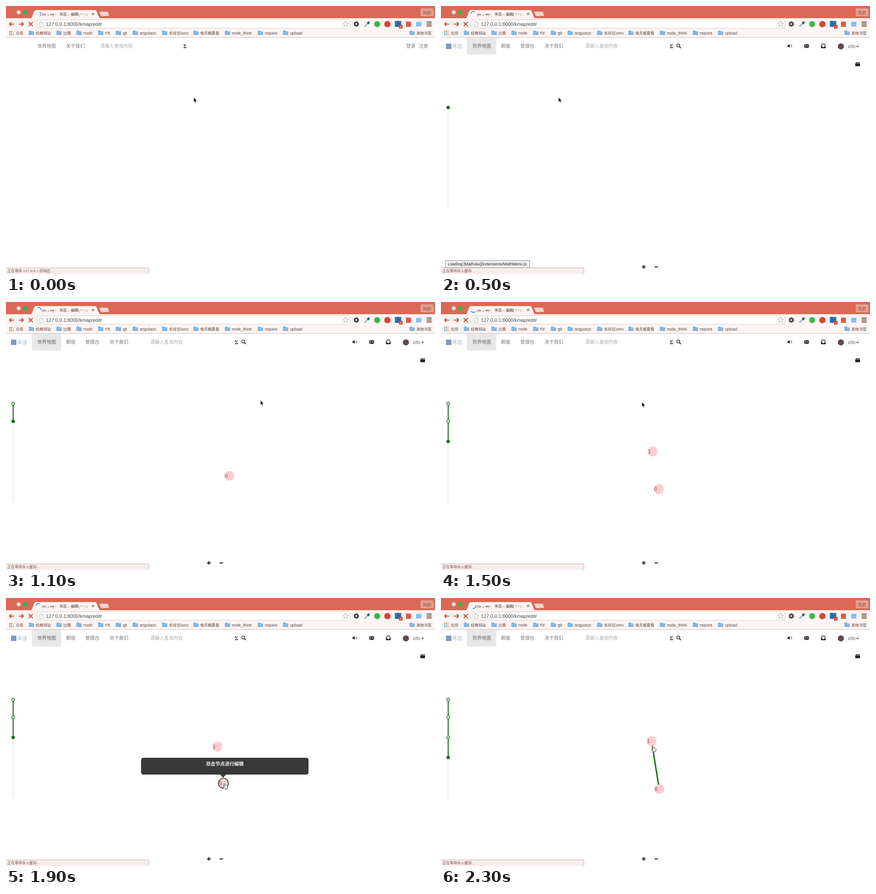
Recreate the animation shown at these times as an HTML page with a canvas. Size 946 by 592 pixels, loop 2.4 s.

```html
<!DOCTYPE html>
<html lang="zh-CN">
<head>
<meta charset="utf-8">
<title>知识图编辑</title>
<style>
html, body { margin: 0; width: 100%; height: 100%; overflow: hidden; background: #fff; }
canvas { display: block; width: 946px; height: 592px; }
</style>
</head>
<body>
<canvas id="stage" width="946" height="592"></canvas>
<script>
const c = document.getElementById('stage').getContext('2d');
const SANS = '"Liberation Sans", "Noto Sans CJK SC", sans-serif';
const SERIF = '"Liberation Serif", serif';
const GREEN = '#087410';
const RED = '#cb513d';
const LOOP = 2400, STEP = 100;

function text(s, x, y, size, color, opt = {}) {
  c.font = `${opt.bold ? 'bold ' : ''}${size}px ${opt.font || SANS}`;
  c.textAlign = opt.align || 'left';
  c.fillStyle = color;
  c.fillText(s, x, y);
}
function rect(x, y, w, h, color) {
  c.fillStyle = color;
  c.fillRect(x, y, w, h);
}
function box(x, y, w, h, r, fill, line) {
  c.beginPath();
  c.roundRect(x, y, w, h, r);
  paint(fill, line, 1);
}
function disc(x, y, r, fill, line, w) {
  c.beginPath();
  c.arc(x, y, r, 0, Math.PI * 2);
  paint(fill, line, w);
}
function shape(pts, fill, line, w, open) {
  c.beginPath();
  for (let i = 0; i < pts.length; i += 2) c.lineTo(pts[i], pts[i + 1]);
  if (!open) c.closePath();
  paint(fill, line, w);
}
function paint(fill, line, w = 1) {
  if (fill) { c.fillStyle = fill; c.fill(); }
  if (line) { c.strokeStyle = line; c.lineWidth = w; c.stroke(); }
}
const line = (pts, color, w) => shape(pts, null, color, w, true);

// keys: [time, x, y] in order
function along(keys, t) {
  let i = 0;
  while (i < keys.length - 1 && keys[i + 1][0] <= t) i++;
  const a = keys[i], b = keys[i + 1];
  if (!b || t <= a[0]) return [a[1], a[2]];
  const k = (t - a[0]) / (b[0] - a[0]);
  return [a[1] + (b[1] - a[1]) * k, a[2] + (b[2] - a[2]) * k];
}

const pointer = [
  [0, 414, 202], [200, 372, 202], [500, 259, 201.5], [600, 268, 202], [900, 610, 212],
  [1100, 561, 217], [1300, 478, 221], [1500, 443, 221], [1600, 450, 260],
  [1700, 473, 370], [1800, 481, 411.5], [1900, 480, 410], [2000, 470, 350],
  [2100, 466, 327.5], [2300, 465.5, 327.5]
];
const nodeA = [
  [1000, 515, 394], [1100, 492.5, 384], [1200, 483, 380], [1300, 476, 392],
  [1500, 480, 413.5], [1800, 479.3, 409], [2100, 479.3, 409.5], [2300, 481.3, 422]
];
const nodeB = [
  [1300, 458, 342], [1500, 466.5, 330], [1800, 466, 328], [2100, 466.3, 328.5], [2300, 464.2, 316]
];

const marks = [
  ['经典网站', 50], ['比赛', 111], ['node', 155], ['FE', 203], ['git', 242], ['angularjs', 279],
  ['禾舟在lumo', 344], ['每天都要看', 413], ['node_think', 482.5], ['require', 555],
  ['upload', 610.5], ['其他书签', 889.5]
];

function folder(x, y) {
  box(x + .5, y, 6, 4, 1, '#6d9fca');
  box(x, y + 1.5, 12, 8, 1, '#82b3db');
  rect(x + .5, y + 3, 11, 1, '#a5cbe8');
}

function arrow(x, dir) {
  line([x - 5 * dir, 40, x + 4 * dir, 40], RED, 2.2);
  line([x + 1 * dir, 35.5, x + 5 * dir, 40, x + 1 * dir, 44.5], RED, 2.2);
}

function star(x, y, r) {
  const p = [];
  for (let i = 0; i < 10; i++) {
    const a = -Math.PI / 2 + i * Math.PI / 5, d = i % 2 ? r * .45 : r;
    p.push(x + d * Math.cos(a), y + d * Math.sin(a));
  }
  shape(p, '#fff', '#a6a09f', 1);
}

function gear(x, y) {
  for (let i = 0; i < 4; i++) {
    const a = i * Math.PI / 4, dx = 6 * Math.cos(a), dy = 6 * Math.sin(a);
    line([x - dx, y - dy, x + dx, y + dy], '#3c3c3c', 2.6);
  }
  disc(x, y, 4.5, '#3c3c3c');
  disc(x, y, 2, '#fbf5f4');
}

function spinner(t) {
  const n = t / STEP;
  const wait = n < 2;
  const mid = (wait ? -n * 45 : -110 + 128.6 * (n - 5)) * Math.PI / 180;
  c.beginPath();
  c.arc(71.5, 17.5, 5.6, mid - 1.05, mid + 1.05);
  paint(null, wait ? '#6f9cc4' : '#3f86cf', 1.7);
}

function chrome(t) {
  rect(0, 0, 946, 28, '#db6855');
  rect(0, 27, 946, 43, '#fcf5f4');
  rect(0, 69, 946, 1, '#c9bfbd');
  disc(28, 14, 4.7, '#dcd8d6');
  disc(43, 14, 4.7, '#2fb752');

  c.beginPath();
  c.moveTo(54, 28);
  c.bezierCurveTo(60, 25, 60, 9, 66, 9);
  c.lineTo(196, 9);
  c.bezierCurveTo(202, 9, 202, 25, 209, 28);
  paint('#fcf5f4');
  spinner(t);
  text('(ө• ₃ •ө)~', 79, 20.5, 8, '#4a3330');
  text('禾弦 – 編輯( *・', 118, 20.5, 8, '#4a3330');
  text('ω', 174, 20.5, 8, '#a69d9b');
  line([189.5, 15, 194.5, 20], '#7c6a67', 1.2);
  line([194.5, 15, 189.5, 20], '#7c6a67', 1.2);
  c.beginPath();
  c.moveTo(207, 12);
  c.lineTo(222, 12);
  c.quadraticCurveTo(225, 12, 226, 15);
  c.lineTo(228, 22);
  c.lineTo(212, 23);
  c.quadraticCurveTo(209, 23, 208, 20);
  c.lineTo(205, 13);
  c.closePath();
  paint('#f1d3cd', '#c55c4a', .7);
  box(914.5, 5.5, 28, 17, 2, '#e6a093', '#d99083');
  text('岚启', 919, 17.5, 9.3, '#8b463b');

  arrow(13, -1);
  arrow(33.5, 1);
  line([50, 35.5, 59, 44.5], RED, 2.4);
  line([59, 35.5, 50, 44.5], RED, 2.4);
  box(68.5, 30.5, 690, 18.5, 2, '#fff', '#d5c9c7');
  shape([74, 34.5, 79, 34.5, 82, 37.5, 82, 45.5, 74, 45.5], '#f7f7f7', '#b5b5b5', 1);
  line([79, 34.5, 79, 37.5, 82, 37.5], '#b5b5b5', .8);
  text('127.0.0.1:8000/kmap/edit/', 88, 43.7, 10.7, '#444');
  star(749, 40, 6.5);

  gear(772.5, 39.8);
  line([790.5, 45.5, 797, 39], '#88a5bd', 2.4);
  line([796, 36, 800, 40], '#39424d', 2);
  line([797.5, 38.5, 801, 35], '#39424d', 4);
  disc(818.5, 40, 6.8, '#4bb34d');
  disc(841, 40, 7, '#d8452f');
  rect(857.5, 33, 14, 13, '#236fae');
  box(866.5, 41.5, 8, 8.5, 1, '#dc4534');
  text('!', 870.5, 48.5, 7, '#fff', { bold: true, align: 'center' });
  rect(882, 34.5, 11, 11.5, '#d95a44');
  rect(904.5, 35, 11.5, 10.5, '#8fbbed');
  for (let i = 0; i < 3; i++) rect(927.5, 34.5 + i * 4.2, 11, 2.2, '#743e35');

  const dots = ['#d9604e', '#d9604e', '#d9a24e', '#58a868', '#5488c7', '#d9a24e', '#58a868', '#5488c7', '#d9604e'];
  dots.forEach((d, i) => rect(7 + (i % 3) * 3.7, 55 + Math.floor(i / 3) * 3.7, 2.2, 2.2, d));
  text('应用', 22, 63, 8, '#603b36');
  for (const [name, x] of marks) {
    folder(x, 54.5);
    text(name, x + 15.4, 63, name < '~' ? 9 : 8.4, '#603b36');
  }
}

function search(x, ready) {
  text('请输入查询内容', x, 92.4, 10.25, '#a8a8a8');
  text('Σ', x + (ready ? 186.5 : 183.5), 92.8, 11.5, '#222', { bold: true, font: SERIF });
}

function guestNav() {
  text('世界地图', 69, 92.4, 10.3, '#777');
  text('关于我们', 132.5, 92.4, 10.3, '#777');
  search(207.5, false);
  text('登录', 882.5, 92.4, 10.3, '#777');
  text('注册', 910.5, 92.4, 10.3, '#777');
}

function userNav() {
  rect(57, 70, 64.5, 37, '#e7e7e7');
  rect(11, 83, 12, 12, '#7c9bc6');
  text('禾弦', 25, 93, 10.8, '#9db2cf');
  text('世界地图', 69, 92.4, 10.3, '#666');
  text('橱窗', 132.5, 92.4, 10.3, '#777');
  text('管理台', 175, 92.4, 10.3, '#777');
  text('关于我们', 228.5, 92.4, 10.3, '#777');
  search(318, true);
  disc(523.2, 87.2, 3.3, null, '#333', 1.4);
  line([525.5, 89.5, 529, 93], '#333', 1.9);

  shape([764, 86.5, 766, 86.5, 769, 84, 769, 92.5, 766, 90, 764, 90], '#222');
  for (const r of [2.2, 4.2]) {
    c.beginPath();
    c.arc(769.5, 88.3, r, -.9, .9);
    paint(null, '#333', .9);
  }
  rect(801, 84.5, 10.5, 8, '#222');
  line([801, 84.5, 806.2, 89.5, 811.5, 84.5], '#fff', 1);
  line([801, 92.5, 804.5, 88.3], '#fff', .8);
  line([811.5, 92.5, 808, 88.3], '#fff', .8);
  shape([840, 84, 846, 84, 847.5, 89, 847.5, 92.5, 838.5, 92.5, 838.5, 89], null, '#222', 1.4);
  shape([838.5, 89, 841, 89, 842, 91, 844.5, 91, 845.5, 89, 847.5, 89, 847.5, 93, 838.5, 93], '#222');
  disc(881.8, 89.3, 6.8, '#5d4c50');
  text('zifo', 897, 92.6, 10.7, '#666');
  shape([915.5, 88, 921.5, 88, 918.5, 91.2], '#444');
  shape([914, 125, 918, 124, 919, 125.2, 923.5, 123.8, 923.5, 126.2, 914, 126.2], '#222');
  rect(913.5, 127, 10.5, 6, '#222');
  rect(443, 575.3, 8.5, 2.2, '#222');
  rect(446.2, 572, 2.2, 8.5, '#222');
  rect(471, 575.3, 7.5, 2.2, '#222');
}

function timeline(t) {
  const count = t >= 2200 ? 4 : t >= 1300 ? 3 : t >= 1000 ? 2 : 1;
  const ys = [224.3, 263.5, 308, 352.3];
  rect(15, 224, 1.4, 218, '#e2e2e2');
  if (count > 1) line([15.8, ys[0], 15.8, ys[count - 1]], GREEN, 2.2);
  for (let i = 0; i < count; i++) {
    if (i === count - 1) disc(15.8, ys[i], 3.8, GREEN);
    else disc(15.8, ys[i], 3.1, '#fff', GREEN, 1.4);
  }
}

function node([x, y], label, ring) {
  disc(x, y, 11, '#ffcdd0', ring && '#2b2222', 1.4);
  text(label, x - 9.8, y + 3.9, 10.6, '#5c4a4a');
}

function link(a, b) {
  const ang = Math.atan2(b[1] - a[1], b[0] - a[0]);
  const dx = Math.cos(ang), dy = Math.sin(ang);
  const ex = b[0] - dx * 11, ey = b[1] - dy * 11;
  line([a[0] + dx * 10, a[1] + dy * 10, ex, ey], GREEN, 3);
  const bx = ex - dx * 10, by = ey - dy * 10;
  shape([ex, ey, bx - dy * 3.2, by + dx * 3.2, bx + dy * 3.2, by - dx * 3.2], '#0b4d12');
}

function tip([x, y]) {
  const left = Math.round(x - 181.3), top = Math.round(y - 56.3);
  box(left + .5, top + .5, 368, 36, 4, '#393939', '#272727');
  shape([x - 8, top + 36, x + 7, top + 36, x - .5, top + 44], '#393939');
  text('双击节点进行编辑', left + 184.5, top + 17.3, 10.4, '#f4f4f4', { bold: true, align: 'center' });
}

function graph(t) {
  if (t < 1000) return;
  const a = along(nodeA, t), b = along(nodeB, t);
  const linked = t >= 2200;
  node(a, '0', t >= 1800 && !linked);
  if (t >= 1300) node(b, '1', t >= 2100 && !linked);
  if (linked) link(a, b);
  if (t >= 1800 && t < 2000) tip(a);
  if (t >= 2100 && !linked) tip(b);
}

function cursor(t) {
  const [x, y] = along(pointer, t);
  c.save();
  c.translate(x, y);
  c.lineJoin = 'round';
  if ((t >= 1800 && t < 2000) || t >= 2100) {
    c.beginPath();
    c.moveTo(0, 1.4);
    c.quadraticCurveTo(1, -.5, 2.2, 1.2);
    c.lineTo(3.3, 4);
    c.quadraticCurveTo(4.8, 2.8, 5.4, 4.2);
    c.quadraticCurveTo(6.8, 3.3, 7.4, 4.8);
    c.quadraticCurveTo(8.8, 4.6, 8.8, 6.2);
    c.lineTo(8.3, 10);
    c.lineTo(7.5, 12.5);
    c.lineTo(2.6, 12.5);
    c.lineTo(-.9, 8.2);
    c.quadraticCurveTo(-.8, 6.6, 1.3, 7.6);
    c.closePath();
    paint('#fff', '#333', 1);
    for (const k of [4, 6]) line([k, 8, k, 10.5], '#555', .6);
  } else {
    shape([0, 0, 0, 10.5, 2.4, 8.4, 4, 12.2, 6, 11.4, 4.4, 7.7, 7.4, 7.5], '#111', '#fff', 1.6);
    shape([.4, .8, .4, 9.8, 2.5, 7.8, 4.2, 11.7, 5.6, 11.1, 3.9, 7.3, 6.6, 7.1], '#111');
  }
  c.restore();
}

function status(t) {
  box(-.5, 578.5, 315.5, 14, 2, '#f7eeec', '#bdb0ae');
  text(t < 200 ? '正在等待 127.0.0.1 的响应...' : '正在等待存入缓存...', 3, 588.3, 8.1, '#7d4a42');
}

function draw(t) {
  rect(0, 0, 946, 592, '#fff');
  chrome(t);
  if (t < 300) guestNav();
  else {
    userNav();
    timeline(t);
    graph(t);
  }
  if (t >= 400 && t < 800) {
    box(9.5, 562.5, 186, 15.5, 0, '#f0f0f0', '#8d8d8d');
    text('Loading [MathJax]/extensions/MathMenu.js', 15, 573.2, 9.05, '#222');
  }
  status(t);
  cursor(t);
}

const start = performance.now();
function tick() {
  const t = (performance.now() - start) % LOOP;
  draw(Math.floor(t / STEP) * STEP);
  requestAnimationFrame(tick);
}
tick();
</script>
</body>
</html>
```
